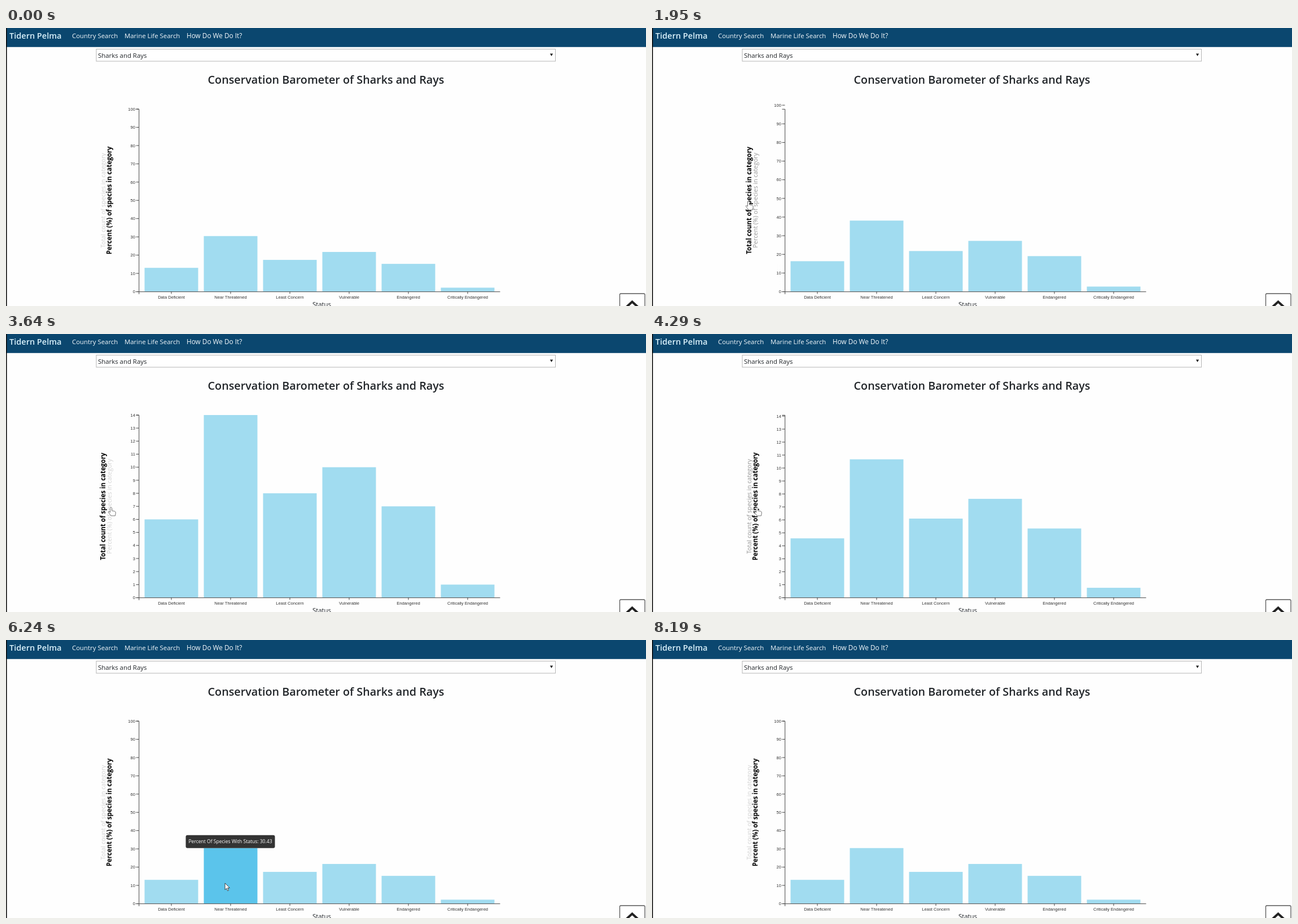
Write an HTML page that moves like this. It is 1134 px wide and 494 px high and loops after 8840 ms.

```html
<!DOCTYPE html>
<html lang="en">
<head>
<meta charset="utf-8">
<title>Conservation Barometer</title>
<style>
html, body { margin: 0; width: 100%; height: 100%; overflow: hidden; background: #fefefe; }
svg { display: block; width: 1134px; height: 494px; }
text { font-family: 'Open Sans', 'Noto Sans', sans-serif; fill: #212529; }
.nav { fill: #f4f9fc; }
.small text, .small { font: 7.6px 'Liberation Sans', Arial, sans-serif; fill: #333; }
.mid { text-anchor: middle; }
.end { text-anchor: end; }
.line { stroke: #444; fill: none; }
</style>
</head>
<body>
<svg id="stage" viewBox="0 0 1134 494">
  <defs><clipPath id="plot"><rect x="160" y="128" width="760" height="366"/></clipPath></defs>
  <rect width="1134" height="494" fill="#fefefe"/>
  <rect width="1134" height="33.8" fill="#0b476f"/>
  <rect width="1.6" height="494" fill="#111"/>
  <text x="6" y="19" font-size="14.5" font-weight="600" style="fill:#d9f1fb">Tidern Pelma</text>
  <text class="nav" x="117" y="18" font-size="11.4">Country Search</text>
  <text class="nav" x="210" y="18" font-size="11.4">Marine Life Search</text>
  <text class="nav" x="320" y="18" font-size="11.8">How Do We Do It?</text>
  <rect x="160" y="37.5" width="813.5" height="21.5" fill="#fff" stroke="#b5b5b5"/>
  <text x="163" y="53" font-size="11.4">Sharks and Rays</text>
  <path d="M963.8 45.5h5.4l-2.7 4.6z" fill="#222"/>
  <text class="mid" x="567" y="99" font-size="19.75" font-weight="600">Conservation Barometer of Sharks and Rays</text>
  <g id="bars"></g>
  <g id="ticks" class="small" clip-path="url(#plot)"></g>
  <path class="line" d="M230.5 144.3H235.7V468.7H230.5M235.7 473V468.7H875.5"/>
  <g id="names" class="small mid"></g>
  <text class="mid" x="559.5" y="494.5" font-size="11.4">Status</text>
  <g id="labels" class="mid"></g>
  <g id="tip">
    <rect x="-79" y="-23" width="158" height="23" rx="3" fill="#333"/>
    <text id="tipText" class="mid" y="-8.3" font-size="8.55" style="fill:#fff"></text>
  </g>
  <rect x="1087.5" y="472" width="44.5" height="30" rx="2" fill="#fff" stroke="#555" stroke-width="1.3"/>
  <path d="M1098 497L1109.5 486.5L1121 497" fill="none" stroke="#222" stroke-width="4"/>
  <path id="cursor" fill="#fff" stroke-width="0.9"/>
</svg>
<script>
const LOOP = 8840, STEP = 130;
const BASE = 468.5, HEIGHT = 324.5;
const LIGHT = '#a1dcf0', HOVER = '#5bc4eb';
const HAND = 'M0 0c1 0 1.5.6 1.5 1.5V6l5 1q2 .6 1.8 3L7.5 15H0L-4.5 9q-.6-1.6 1-1.6L-1.5 9V1.5C-1.5.6-1 0 0 0Z';
const ARROW = 'M0 0V11.8L2.7 9.3 4.6 13.6 6.5 12.8 4.7 8.6H8.4Z';

const counts = [6, 14, 8, 10, 7, 1];
const total = counts.reduce((a, b) => a + b);
const statuses = ['Data Deficient', 'Near Threatened', 'Least Concern',
  'Vulnerable', 'Endangered', 'Critically Endangered'];

// Each click starts the bars, and slightly later the axis: [start, duration]
const toCount = { bars: [1669, 900], axis: [1852, 1030] };
const toPercent = { bars: [3891, 900], axis: [4167, 1014] };

// Pointer stops: time, x, y
const route = [
  [390, 225, 500], [1040, 171, 308],
  [2990, 171, 308], [3380, 186, 308],
  [5460, 186, 308], [5720, 290, 448],
  [5980, 290, 448], [6240, 388, 432], [6370, 392, 438],
  [6500, 392, 438], [7020, 505, 442],
  [7800, 505, 442], [8190, 520, 505]
];

const $ = id => document.getElementById(id);
const clamp = v => Math.max(0, Math.min(1, v));
const lerp = (a, b, k) => a + (b - a) * k;
const ease = k => k < 0.5 ? 4 * k ** 3 : 1 - 4 * (1 - k) ** 3;
const run = (t, [start, length]) => ease(clamp((t - start) / length));
const yOf = (v, max) => BASE - HEIGHT * v / max;

function add(parent, tag, attrs, text) {
  const el = document.createElementNS('http://www.w3.org/2000/svg', tag);
  set(el, attrs);
  if (text !== undefined) el.textContent = text;
  parent.appendChild(el);
  return el;
}
function set(el, attrs) {
  for (const key in attrs) el.setAttribute(key, attrs[key]);
}

const bars = counts.map((n, i) => {
  const x = 245.5 + 105 * i, mid = x + 47.5;
  add($('names'), 'path', { class: 'line', d: `M${mid} 468.5v4` });
  add($('names'), 'text', { x: mid, y: 481 }, statuses[i]);
  return { n, x, mid, percent: 100 * n / total,
    el: add($('bars'), 'rect', { x, width: 95 }) };
});

const ticks = [];
function addTick(value, inPercent, inCount) {
  const el = add($('ticks'), 'g', {});
  add(el, 'path', { class: 'line', d: 'M230.5 0h5' });
  add(el, 'text', { class: 'end', x: 229, y: 2.7 }, value);
  ticks.push({ value, inPercent, inCount, el });
}
for (let v = 0; v <= 100; v += 10) addTick(v, true, v <= 14);
for (let v = 1; v <= 14; v++) if (v % 10) addTick(v, false, true);

const countLabel = add($('labels'), 'text',
  { transform: 'translate(175.5 306.3) rotate(-90)' }, 'Total count of species in category');
const percentLabel = add($('labels'), 'text',
  { transform: 'translate(187 306.3) rotate(-90)' }, 'Percent (%) of species in category');

function styleLabel(el, active, since) {
  const grey = Math.round(lerp(150, 210, clamp((since - 400) / 400)));
  el.style.fill = active ? '#000' : `rgb(${grey},${grey},${grey})`;
  set(el, { 'font-size': active ? 11.5 : 10.9, 'font-weight': active ? 700 : 400 });
}

function pointer(t) {
  const i = route.findIndex(p => p[0] > t);
  if (i < 1) return null;
  const [t0, x0, y0] = route[i - 1], [t1, x1, y1] = route[i];
  const k = (t - t0) / (t1 - t0);
  return { x: lerp(x0, x1, k), y: lerp(y0, y1, k) };
}

function draw(time) {
  const t = Math.floor(time % LOOP / STEP) * STEP;
  const barMix = run(t, toCount.bars) - run(t, toPercent.bars);
  const axisMix = run(t, toCount.axis) - run(t, toPercent.axis);
  const p = pointer(t);
  let over = null;

  for (const b of bars) {
    const top = lerp(yOf(b.percent, 100), yOf(b.n, 14), barMix);
    const hit = p && p.x > b.x && p.x < b.x + 95 && p.y > top && p.y < BASE;
    if (hit) over = { b, top };
    set(b.el, { y: top, height: BASE - top, fill: hit ? HOVER : LIGHT });
  }

  for (const k of ticks) {
    const y = lerp(yOf(k.value, 100), yOf(k.value, 14), axisMix);
    const opacity = (k.inPercent ? 1 - axisMix : 0) + (k.inCount ? axisMix : 0);
    set(k.el, { transform: `translate(0 ${y})`, opacity });
  }

  const on = toCount.bars[0], off = toPercent.bars[0];
  const counting = t >= on && t < off;
  const since = t < on ? LOOP : t - (counting ? on : off);
  styleLabel(countLabel, counting, since);
  styleLabel(percentLabel, !counting, since);

  $('tip').style.display = over ? '' : 'none';
  if (over) {
    set($('tip'), { transform: `translate(${over.b.mid - 0.5} ${over.top})` });
    $('tipText').textContent = 'Percent Of Species With Status: ' + over.b.percent.toFixed(2);
  }

  $('cursor').style.display = p ? '' : 'none';
  if (p) {
    const link = p.x < 192 && p.y > 210 && p.y < 402;
    set($('cursor'), { d: link ? HAND : ARROW, stroke: link ? '#666' : '#333',
      transform: `translate(${p.x} ${p.y})` });
  }
}

const begin = performance.now();
function tick() {
  draw(performance.now() - begin);
  requestAnimationFrame(tick);
}
tick();
</script>
</body>
</html>
```
